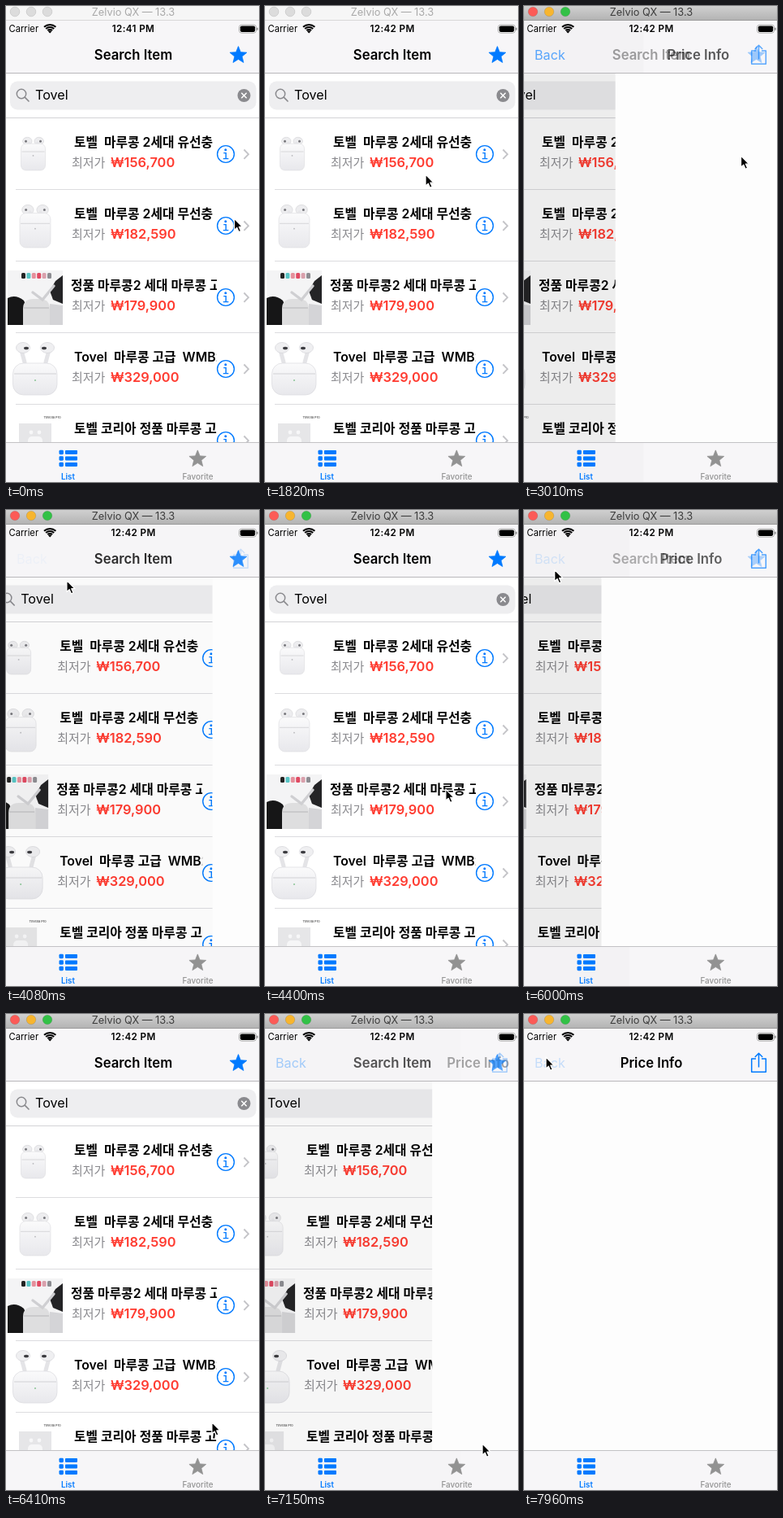
Recreate the animation shown at these times as an HTML page. Size 312 by 585 pixels, loop 8000 ms.

```html
<!DOCTYPE html>
<html lang="ko">
<head>
<meta charset="utf-8">
<style>
html, body { margin: 0; width: 100%; height: 100%; overflow: hidden; background: #fff; }
svg { display: block; width: 312px; height: 585px; font-family: Inter, "Noto Sans CJK KR", "Noto Sans CJK", sans-serif; }
</style>
</head>
<body>
<svg id="stage" viewBox="0 0 312 585"></svg>
<script>
const BLUE = '#007aff', LOOP = 8000;
const stage = document.getElementById('stage');

const rect = (x, y, w, h, fill, r = 0, more = '') =>
  `<rect x="${x}" y="${y}" width="${w}" height="${h}" rx="${r}" fill="${fill}" ${more}/>`;
const circle = (x, y, r, fill, more = '') =>
  `<circle cx="${x}" cy="${y}" r="${r}" fill="${fill}" ${more}/>`;
const path = (d, fill, more = '') => `<path d="${d}" fill="${fill}" ${more}/>`;
const line = (d, color, w, more = '') =>
  path(d, 'none', `stroke="${color}" stroke-width="${w}" ${more}`);
const text = (x, y, size, weight, fill, s, more = '') =>
  `<text x="${x}" y="${y}" font-size="${size}" font-weight="${weight}" fill="${fill}" ${more}>${s.replace(/ /g, '\u00a0')}</text>`;
const MID = 'text-anchor="middle"';

function star(cx, cy, r, fill) {
  const pts = Array.from({ length: 10 }, (_, i) => {
    const a = i * Math.PI / 5 - Math.PI / 2, q = i % 2 ? r * 0.44 : r;
    return (cx + q * Math.cos(a)).toFixed(2) + ',' + (cy + q * Math.sin(a)).toFixed(2);
  });
  return `<polygon points="${pts.join(' ')}" fill="${fill}" stroke="${fill}" stroke-width=".8" stroke-linejoin="round"/>`;
}

// earbuds standing above a rounded case
function buds(x, y, w, h) {
  const c = x + w / 2, b = w * 0.19;
  const bud = d => `<ellipse cx="${c + d * w * 0.24}" cy="${y + b * 0.9}" rx="${b}" ry="${b * 0.85}" fill="#ededef" stroke="#d6d6d9" stroke-width=".7"/>` +
    rect(c + d * w * 0.17 - 2, y + b, 4, h * 0.3, '#e6e6e9', 2) +
    circle(c + d * w * 0.3, y + b * 0.9, 1.5, '#77777c');
  return bud(-1) + bud(1) +
    rect(x, y + h * 0.2, w, h * 0.8, 'url(#case)', w * 0.2, 'stroke="#dcdcdf" stroke-width=".6"') +
    line(`M${x + 1} ${y + h * 0.44}h${w - 2}`, '#d0d0d4', 0.8) +
    circle(c, y + h * 0.56, 0.9, '#b9b9bd');
}

function handPhoto() {
  const tones = ['#222', '#58c4c4', '#e58f9b', '#e04a62', '#d9a0ac', '#8d8d92'];
  return rect(2, 325, 68, 67, '#f4f4f5') +
    tones.map((c, i) => rect(19 + i * 6.4, 328, 5, 7, c, 1.5)).join('') +
    path('M2 359Q12 354 22 362L28 375L26 392H2Z', '#161617') +
    path('M70 331L61 338L54 350L58 361L70 366Z', '#242426') +
    path('M54 366L70 368V392H54Z', '#d4d4d7') +
    path('M21 392V372Q21 360 34 360H43Q54 361 54 373V392Z', '#dededf') +
    line('M22 371H53', '#b5b5b8', 1) +
    line('M33 352L45 361L59 344', '#cfcfd2', 3.4, 'stroke-linecap="round"');
}

function proBuds() {
  const bud = d => {
    const x = 36 + d * 15;
    return line(`M${x + d * 2} 423L${x - d * 2} 438`, '#e4e4e7', 5, 'stroke-linecap="round"') +
      `<ellipse cx="${x}" cy="420" rx="8.5" ry="6.5" fill="#efeff1" stroke="#d5d5d8" stroke-width=".7"/>` +
      `<ellipse cx="${x - d * 4}" cy="420.5" rx="3" ry="1.8" fill="#3c3c40"/>`;
  };
  return bud(-1) + bud(1) +
    rect(8.5, 439, 54.5, 39, 'url(#case)', 13, 'stroke="#dadade" stroke-width=".7"') +
    line('M10 452H62', '#cdcdd1', 0.9) + circle(36, 460, 1.1, '#8fc79a');
}

function boxPhoto() {
  return text(57, 507, 4, 600, '#666', 'Tovella Pro', MID) +
    rect(16, 513, 40, 40, '#e6e6e8') +
    rect(27, 529, 18, 16, '#f6f6f7', 5) +
    circle(31, 524, 2.4, '#f7f7f8') + circle(41, 524, 2.4, '#f7f7f8');
}

const items = [
  [84, '토벨  마루콩 2세대 유선충', '156,700', buds(18.5, 161, 30, 41)],
  [84, '토벨  마루콩 2세대 무선충', '182,590', buds(17, 244, 38, 53)],
  [80, '정품 마루콩2 세대 마루콩 고급', '179,900', handPhoto()],
  [84, 'Tovel  마루콩 고급  WMB2', '329,000', proBuds()],
  [84, '토벨 코리아 정품 마루콩 고', '312,000', boxPhoto()]
];

function row([x, name, price, thumb], i) {
  const y = 137 + 88 * i;
  return thumb +
    `<g clip-path="url(#cut)">${text(x, y + 35.5, 15.8, 600, '#000', name)}</g>` +
    text(81, y + 60.5, 15, 400, '#8a8a8e', '최저가') +
    text(129, y + 61, 16.4, 600, '#ff3b30', '₩' + price) +
    `<g id="info${i}">` + circle(271, y + 45, 10.4, 'none', `stroke="${BLUE}" stroke-width="1.4"`) +
    circle(270.8, y + 39.8, 1.5, BLUE) +
    line(`M268.3 ${y + 43.6}h2.9v7M267.8 ${y + 50.6}h6.6`, BLUE, 1.4) + '</g>' +
    line(`M293.5 ${y + 39.5}l5.5 5.7l-5.5 5.7`, '#c4c4c8', 1.9) +
    line(`M12 ${y + 88.5}H330`, '#dcdcdf', 1);
}

const list = rect(-10, 83, 420, 454, '#fff') +
  rect(5, 92.5, 303.5, 35, '#eeeef0', 9) +
  circle(19, 108, 5.7, 'none', 'stroke="#8a8a8e" stroke-width="1.5"') +
  line('M23.2 112.2L28 117', '#8a8a8e', 1.7, 'stroke-linecap="round"') +
  text(36, 115, 16.2, 400, '#000', 'Tovel') +
  circle(293.5, 110, 8, '#8a8a8e') +
  line('M290.3 106.8l6.4 6.4m0-6.4l-6.4 6.4', '#fff', 1.5) +
  line('M0 137.5H330', '#d4d4d7', 1) + items.map(row).join('');

const titleBar = (bg, edge, lights, rim, ink) => rect(0, 0, 312, 18, bg) +
  rect(0, 17, 312, 1, edge) +
  lights.map((c, i) => circle(11 + 20 * i, 7, 5.8, c, `stroke="${rim}" stroke-width=".8"`)).join('') +
  text(157, 11.8, 12.8, 400, ink, 'Zelvio QX — 13.3', MID);

const wifi = [4.2, 7.4, 10.6].map((r, i) => {
  const d = r * 0.68;
  return line(`M${54.2 - d} ${33 - d}A${r} ${r} 0 0 1 ${54.2 + d} ${33 - d}`, '#000', i ? 2 : 2.2);
}).join('') + path('M54.2 33.5l-2.2-2.2a3.2 3.2 0 0 1 4.4 0Z', '#000');

const battery = rect(287.5, 23.2, 21, 10, '#fff', 3, 'stroke="#999" stroke-width=".8"') +
  rect(288.8, 24.5, 18.4, 7.4, '#000', 1.8) + rect(309.3, 26.6, 1.4, 3.4, '#888', 0.7);

const tabIcon = [548.5, 556, 563.5].map(y =>
  rect(65.5, y - 2.7, 5.4, 5.4, BLUE, 1.4) + rect(73, y - 2.4, 15, 4.8, BLUE, 0.8)).join('');

stage.innerHTML = `<defs>
  <clipPath id="cut"><rect x="70" y="130" width="190" height="420"/></clipPath>
  <linearGradient id="case" x2="0" y2="1"><stop stop-color="#fafafb"/><stop offset="1" stop-color="#e8e8ec"/></linearGradient>
  <linearGradient id="metal" x2="0" y2="1"><stop stop-color="#d0d0d0"/><stop offset="1" stop-color="#b2b2b2"/></linearGradient>
</defs>
<g id="list">${list}</g>
${rect(0, 83, 312, 454, '#000', 0, 'id="dim"')}
${rect(312, 83, 312, 454, '#fdfdfd', 0, 'id="page"')}
${rect(0, 18, 312, 64, '#f7f6f8')}${rect(0, 537, 312, 48, '#f7f6f8')}
<g id="shade">${rect(-312, 18, 312, 64, '#000')}${rect(-312, 537, 312, 48, '#000')}</g>
${rect(0, 82, 312, 1, '#b9b8bb')}${rect(0, 536, 312, 1, '#c3c2c5')}
${text(3.5, 32.3, 11.2, 400, '#000', 'Carrier')}${wifi}
${text(157, 32.3, 11.7, 600, '#000', '12:41 PM', MID + ' letter-spacing=".35" id="clock"')}
${battery}
${text(157, 66.2, 16.7, 600, '#000', 'Search Item', MID + ' id="search"')}
${text(157, 66.2, 16.7, 600, '#000', 'Price Info', MID + ' id="price"')}
${text(13, 66.2, 16.2, 400, BLUE, 'Back', 'id="back"')}
<g id="star">${star(286.5, 60.6, 11, BLUE)}</g>
<g id="share">${line('M286 55H280.7V71.3H298.3V55H293M289.5 65.5V48.5M284.8 53L289.5 48.2L294.2 53', BLUE, 1.5, 'stroke-linejoin="round"')}</g>
${tabIcon}${text(76.5, 582, 9.8, 600, BLUE, 'List', MID)}
${star(236.3, 556.8, 10.9, '#929292')}${text(236.5, 582, 9.9, 500, '#929292', 'Favorite', MID)}
<g id="idle">${titleBar('#f6f6f6', '#d8d8d8', ['#dcdcdc', '#dcdcdc', '#dcdcdc'], '#c9c9c9', '#a9a9a9')}</g>
<g id="active">${titleBar('url(#metal)', '#9b9b9b', ['#fc5b57', '#f7b52f', '#32c146'], '#0002', '#3c3c3c')}</g>
<g id="cursor">${path('M0 0V14.2L3.3 11.2L5.6 16.4L8.2 15.2L5.9 10.2H10.2Z', '#000', 'stroke="#fff" stroke-width="1.3" stroke-linejoin="round"')}</g>`;

const el = {};
stage.querySelectorAll('[id]').forEach(n => el[n.id] = n);
const fade = (id, a) => el[id].setAttribute('opacity', Math.max(0, Math.min(1, a)).toFixed(3));
const move = (id, x, y = 0) => el[id].setAttribute('transform', `translate(${x.toFixed(2)} ${y.toFixed(2)})`);

// time, x, y of the pointer tip
const track = [
  [0, 281.5, 261.3], [840, 281.5, 261.3], [1580, 198, 207], [1840, 198, 207], [1960, 192, 209],
  [2460, 267.5, 184], [3080, 267.5, 184], [3640, 28, 54], [3880, 28, 54], [4080, 74.5, 86],
  [4480, 254, 365], [4630, 265, 354], [5080, 265, 354], [5670, 28, 54], [5930, 28, 54],
  [6410, 253.5, 501], [6520, 268, 517], [6630, 268, 528], [7230, 268, 528],
  [7840, 27, 54], [7960, 27, 53], [8000, 27, 53]
];

function slope(i, k) {
  const a = track[i - 1], b = track[i], c = track[i + 1];
  if (!a || !c) return 0;
  const rest = q => q[1] === b[1] && q[2] === b[2];
  return rest(a) || rest(c) || (b[k] - a[k]) * (c[k] - b[k]) <= 0 ? 0 : (c[k] - a[k]) / (c[0] - a[0]);
}

function pointer(t, k) {
  const i = Math.max(0, track.findIndex(q => q[0] > t) - 1);
  const a = track[i], b = track[i + 1], d = b[0] - a[0], u = (t - a[0]) / d;
  const s = u * u * (3 - 2 * u);
  return a[k] + (b[k] - a[k]) * s +
    d * (slope(i, k) * u * (1 - u) ** 2 - slope(i + 1, k) * u * u * (1 - u));
}

// press time, spring start, direction, pressed row
const moves = [
  [2840, 2892, 1, 0], [3790, 3911, 0], [4890, 4849, 1, 2],
  [5820, 5940, 0], [7040, 7085, 1, 4], [7945, 8100, 0]
];

function spring(ms) {
  const x = Math.max(0, ms) * 0.01826;
  return 1 - (1 + x) * Math.exp(-x);
}

function draw(t) {
  const m = moves.filter(q => t >= q[0]).pop();
  const pop = m && !m[2];
  const e = m ? spring(t - m[1]) : 0;
  let p = pop ? 1 - e : e;
  if (p < 0.002) p = 0;
  if (p > 0.998) p = 1;

  move('list', -97 * p);
  fade('dim', 0.11 * p);
  move('page', -312 * p);
  move('shade', 312 * (1 - p) + 35);
  fade('shade', p > 0 && p < 1 ? 0.025 * p : 0);
  fade('search', 1 - p);
  fade('star', 1 - p);
  fade('share', p);
  fade('price', pop ? (p - 0.2) / 0.8 : p);
  move('price', 160 * (1 - p));
  fade('back', pop ? 0.2 * p : p);
  items.forEach((_, i) => fade('info' + i, m && m[3] === i && t < m[0] + 300 ? 0.3 : 1));

  el.clock.textContent = t < 1200 ? '12:41 PM' : '12:42 PM';
  fade('idle', t < 2700 ? 1 : 0);
  fade('active', t < 2700 ? 0 : 1);
  move('cursor', pointer(t, 1), pointer(t, 2));
}

const t0 = performance.now();
function tick() {
  draw((performance.now() - t0) % LOOP);
  requestAnimationFrame(tick);
}
tick();
</script>
</body>
</html>
```
